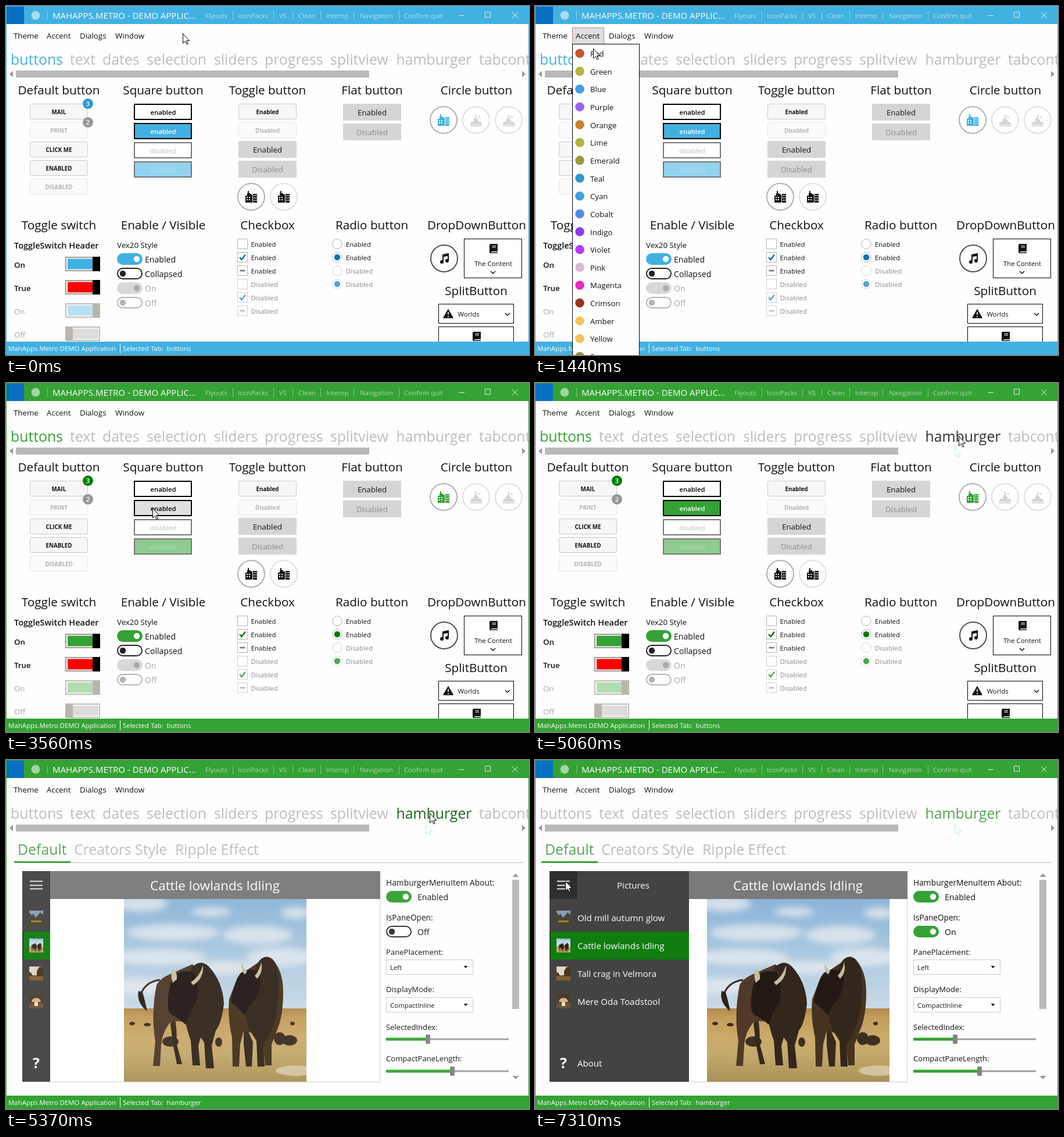
These frames come from a looping animation (900x600 px, 8 s). An HTML page:

```html
<!DOCTYPE html>
<html lang="en">
<head>
<meta charset="utf-8">
<title>Metro demo application</title>
<style>
html, body { margin: 0; width: 100%; height: 100%; overflow: hidden; background: #fff; }
svg { display: block; }
text { font-family: "Open Sans", "Noto Sans", sans-serif; white-space: pre; }

/* One 8 s clock: 1% is 80 ms */
.a, #stage { animation: 8s step-end infinite; }

#stage { animation-name: theme; }
@keyframes theme {
  0% { --accent: #41b1e1; --deep: #0b72b8; --badge: #2a9bd6; --light: #93d3ee; --pale: #b8e1f4; --mild: #5aa2d6; }
  36.4%, to { --accent: #34a234; --deep: #057a05; --badge: #067f06; --light: #90cb90; --pale: #b2ddb2; --mild: #53a653; }
}

.cursor { animation-name: cursor; }
@keyframes cursor {
  0% { transform: translate(304px, 47px); }
  1.25% { transform: translate(304px, 47px); animation-timing-function: steps(8, jump-both); }
  9% { transform: translate(90px, 49px); }
  17.9% { transform: translate(100px, 73px); animation-timing-function: steps(10, end); }
  27.875% { transform: translate(97px, 250px); }
  33.375% { transform: translate(109px, 256px); }
  42.375% { transform: translate(109px, 256px); animation-timing-function: steps(2, jump-both); }
  44.375% { transform: translate(252px, 215px); animation-timing-function: steps(8, end); }
  52.25% { transform: translate(722px, 109px); }
  53.25% { transform: translate(720px, 95px); }
  54.125% { transform: translate(720px, 84px); }
  60% { transform: translate(717px, 79px); }
  61% { transform: translate(729px, 91px); }
  74.75% { transform: translate(729px, 91px); animation-timing-function: steps(2, jump-both); }
  76.75% { transform: translate(518px, 168px); animation-timing-function: steps(6, end); }
  82.5% { transform: translate(64px, 224px); animation-timing-function: steps(2, end); }
  84.5%, to { transform: translate(52px, 208px); }
}
.ghost { animation-name: ghost; }
@keyframes ghost { 0% { opacity: 0; } 53.25%, to { opacity: 1; } }

.accent-hover { animation-name: accentHover; }
@keyframes accentHover { 0% { opacity: 0; } 9% { opacity: 1; } 35.5%, to { opacity: 0; } }
.menu { animation-name: menu; }
@keyframes menu {
  0% { opacity: 0; }
  11.125% { opacity: 0; animation-timing-function: steps(3, jump-both); }
  14.125% { opacity: 1; }
  35.5%, to { opacity: 0; }
}
.row { animation-name: row; }
@keyframes row {
  0% { opacity: 0; transform: none; }
  18.75% { opacity: 1; transform: none; animation-timing-function: steps(6, end); }
  27.875%, to { opacity: 1; transform: translateY(183.9px); }
}

.click-hover { animation-name: clickHover; }
@keyframes clickHover { 0% { opacity: 0; } 37.375% { opacity: 1; } 42.375%, to { opacity: 0; } }
.square-hover { animation-name: squareHover; }
@keyframes squareHover { 0% { opacity: 0; } 44.375% { opacity: 1; } 45.4%, to { opacity: 0; } }

.first { animation-name: first; }
@keyframes first { 0% { opacity: 1; } 64.125%, to { opacity: 0; } }
.tab-first { animation-name: tabFirst; }
@keyframes tabFirst { 0% { fill: var(--accent); } 64.125%, to { fill: #bdbdbd; } }
.tab-burger { animation-name: tabBurger; }
@keyframes tabBurger {
  0% { fill: #bdbdbd; }
  53.25% { fill: #333; }
  65% { fill: #1d661d; }
  74.75%, to { fill: #56a256; }
}
.second { animation-name: second; }
@keyframes second {
  0% { opacity: 0; transform: translateX(30px); }
  64.125% { opacity: .1; transform: translateX(26px); }
  65.1% { opacity: .5; transform: translateX(15px); }
  66.1% { opacity: .82; transform: translateX(7px); }
  67.1% { opacity: .96; transform: translateX(3px); }
  68.1% { opacity: .98; transform: translateX(2px); }
  69.1% { opacity: 1; transform: translateX(1px); }
  71%, to { opacity: 1; transform: none; }
}
.status-burger { animation-name: statusBurger; }
@keyframes statusBurger { 0% { opacity: 0; } 64.125%, to { opacity: 1; } }

.pane { width: 48px; animation-name: pane; }
@keyframes pane {
  0% { width: 48px; }
  86% { width: 48px; animation-timing-function: cubic-bezier(.1, .9, .2, 1); }
  91.25%, to { width: 240px; }
}
.shift { animation-name: shift; }
@keyframes shift {
  0% { transform: none; }
  86% { transform: none; animation-timing-function: cubic-bezier(.1, .9, .2, 1); }
  91.25%, to { transform: translateX(96px); }
}
.burger-hover { animation-name: burgerHover; }
@keyframes burgerHover { 0% { opacity: 0; } 84.5%, to { opacity: 1; } }
.closed { animation-name: closed; }
@keyframes closed { 0% { opacity: 1; } 86.5%, to { opacity: 0; } }
.open { animation-name: open; }
@keyframes open { 0% { opacity: 0; } 86.5%, to { opacity: 1; } }
</style>
</head>
<body>
<svg id="stage" width="900" height="600" viewBox="0 0 900 600"></svg>
<script>
const INK = '#111', GRAY = '#a8a8a8', ACCENT = 'var(--accent)', DEEP = 'var(--deep)';

const text = (x, y, s, size = 13.3, fill = INK, attrs = '') =>
  `<text x="${x}" y="${y}" font-size="${size}" fill="${fill}" ${attrs}>${s}</text>`;
const mid = (x, y, s, size, fill, attrs = '') => text(x, y, s, size, fill, `text-anchor="middle" ${attrs}`);
const rect = (x, y, w, h, fill, attrs = '') =>
  `<rect x="${x}" y="${y}" width="${w}" height="${h}" fill="${fill}" ${attrs}/>`;
const circle = (x, y, r, fill, attrs = '') => `<circle cx="${x}" cy="${y}" r="${r}" fill="${fill}" ${attrs}/>`;
const oval = (x, y, rx, ry, fill, attrs = '') =>
  `<ellipse cx="${x}" cy="${y}" rx="${rx}" ry="${ry}" fill="${fill}" ${attrs}/>`;
const path = (d, fill, attrs = '') => `<path d="${d}" fill="${fill}" ${attrs}/>`;
const line = (d, stroke, width = 1) => path(d, 'none', `stroke="${stroke}" stroke-width="${width}"`);
const group = (cls, ...parts) => `<g class="${cls}">${parts.join('')}</g>`;
const each = (list, fn) => list.map(fn).join('');
const at = (x, y, body) => `<g transform="translate(${x} ${y})">${body}</g>`;

const ARROW = 'M.5 .5V17L4.3 13.4 7 19 9.2 18 6.7 12.7H11.7Z';

const city = (x, y, fill) => at(x, y, path(
  'M-10 10V-2H-7V-6H-6V-10H-4V-6H-1V-4H2V10ZM-8 0v2h2V0ZM-4 0v2h2V0ZM-8 4v2h2V4ZM-4 4v2h2V4Z' +
  'M3 10V-5H10V10ZM4.5 -3v2h1.5v-2ZM7.5 -3v2h1.5v-2ZM4.5 1v2h1.5v-2ZM7.5 1v2h1.5v-2ZM4.5 5v2h1.5v-2ZM7.5 5v2h1.5v-2Z',
  fill, 'fill-rule="evenodd"'));
const ship = (x, y, fill) => at(x, y,
  path('M-11 8H11L8 3H4V-1H1V-9H-1V-3H-4V3H-8ZM3 -6H7V-4H3Z', fill) + rect(-10, 9, 20, 2, fill));
const book = (x, y) => at(x, y,
  path('M2 0H14V13H3V14.500H14V16H2Q0 16 0 14V2Q0 0 2 0Z', INK) + line('M4.500 3.500H11M4.500 6H11', '#fff'));
const chevron = (x, y) => line(`M${x - 4} ${y - 2}L${x} ${y + 2}L${x + 4} ${y - 2}`, INK, 1.5);
const tri = (x, y, dx, dy) => path(dx
  ? `M${x + dx * 3} ${y}L${x - dx * 3} ${y - 5.5}V${y + 5.5}Z`
  : `M${x} ${y + dy * 3}L${x - 5.5} ${y - dy * 3}H${x + 5.5}Z`, '#999');

const pill = (x, y, on, color, dot) =>
  rect(x + 1, y - 9, 42, 18, on ? color : '#fff', `rx="9" stroke="${color}" stroke-width="2"`) +
  circle(x + (on ? 34 : 10), y, 5.2, dot);

const softButton = (x, y, label, dim) =>
  rect(x + .5, y + .5, 99, 26, dim ? '#fbfbfb' : '#f7f7f7', `rx="2.5" stroke="${dim ? '#e6e6e6' : '#c9c9c9'}"`) +
  mid(x + 50, y + 18, label, 9.8, dim ? '#b5b5b5' : INK, 'font-weight="700"');
const flatButton = (x, y, label, dim) =>
  rect(x, y, 100, 29, '#d5d5d5') + mid(x + 50, y + 20, label, 13.3, dim ? '#8e8e8e' : INK);
const squareButton = (y, label, fill, color, dim) =>
  rect(221, y + 1, 98, 26, fill, `stroke="${dim ? '#757575' : '#000'}" stroke-width="2"`) +
  mid(270.5, y + 19, label, 11.3, color, dim ? '' : 'font-weight="600"');
const ring = (x, y, stroke) => circle(x, y, 23, '#fff', `stroke="${stroke}" stroke-width="2"`);

const toggle = (y, on, fill, dim) => {
  const knob = dim ? '#bab5af' : '#000';
  return rect(103, y - 11.5, 58, 23, '#fff', `stroke="${dim ? '#c4bcb4' : '#a39b91'}" stroke-width="2"`) +
    rect(106, y - 9, 53, 18, fill) + rect(on ? 149 : 102, y - 12.5, 13, 25, knob);
};

const check = (y, mark, dim) =>
  rect(398.5, y - 8.5, 17, 17, '#fff', `stroke="${dim ? '#d0d0d0' : '#b4b4b4'}"`) +
  (mark === 1 ? line(`M402 ${y}L405.500 ${y + 4}L412 ${y - 4.500}`, dim ? 'var(--mild)' : DEEP, 2.4) : '') +
  (mark === 2 ? line(`M402.500 ${y}H411.500`, dim ? '#bbb' : '#777', 2.6) : '') +
  text(421.5, y + 5, dim ? 'Disabled' : 'Enabled', 11.4, dim ? '#8c8c8c' : INK);
const radio = (y, on, dim) =>
  circle(570, y, 8.3, '#fff', `stroke="${dim ? '#d4d4d4' : '#b0b0b0'}"`) +
  (on ? circle(570, y, 5.2, dim ? 'var(--mild)' : DEEP) : '') +
  text(585, y + 5, dim ? 'Disabled' : 'Enabled', 11.4, dim ? '#8c8c8c' : INK);

// Window chrome
const commands = [[343, 'Flyouts'], [399, 'IconPacks'], [470, 'VS'], [503, 'Clean'],
  [551, 'Interop'], [609, 'Navigation'], [685, 'Confirm quit']];
const tabs = [[8, 'buttons', 'a tab-first'], [110, 'text'], [166, 'dates'], [242, 'selection'], [358, 'sliders'],
  [445, 'progress'], [558, 'splitview'], [671.5, 'hamburger', 'a tab-burger'], [814, 'tabcontrol']];

const chrome =
  rect(0, 0, 900, 600, '#fefefe') +
  rect(0, 0, 900, 31, ACCENT) + rect(1, 1, 30, 30, '#0870c0') +
  circle(51, 16, 7.5, '#fff', 'opacity=".55"') +
  text(80, 22, 'MAHAPPS.METRO - DEMO APPLIC...', 15, '#fff') +
  `<g opacity=".6">${each(commands, ([x, s]) => text(x, 21, s, 11.4, '#fff'))}</g>` +
  `<g opacity=".4">${line(each([71, 390, 460, 493, 541, 598, 676], x => `M${x}.500 9V24`), '#fff')}</g>` +
  line('M779 16.500H789M824.500 10.500H833.500V19.500H824.500ZM871 11L881 21M881 11L871 21', '#e4f3ec') +
  group('a accent-hover', rect(64.5, 37.5, 54, 28, '#dedede', 'stroke="#b08c7c"')) +
  each([[13, 'Theme'], [70, 'Accent'], [127, 'Dialogs'], [188, 'Window']], ([x, s]) => text(x, 56, s)) +
  each(tabs, ([x, s, cls = '']) => text(x, 100.5, s, 24.8, '#bdbdbd', `class="${cls}"`)) +
  tri(9, 117, -1, 0) + rect(17, 111, 608, 12, '#b9b9b9') + tri(891, 117, 1, 0);

const status =
  rect(0, 577, 900, 23, ACCENT) + rect(.5, .5, 899, 599, 'none', `stroke="${ACCENT}"`) +
  text(4, 593, 'MahApps.Metro DEMO Application', 11.45, '#fff') + rect(196, 580, 1, 17, '#fff') +
  text(201, 593, 'Selected Tab:', 11.45, '#fff') +
  group('a first', text(276.5, 593, 'buttons', 11.5, '#fff')) +
  group('a status-burger', text(276.5, 593, 'hamburger', 11.3, '#fff'));

// First page
const headings = [
  [91, 152, 'Default button'], [270.5, 152, 'Square button'], [450, 152, 'Toggle button'],
  [630, 152, 'Flat button'], [809.5, 152, 'Circle button'], [91, 384, 'Toggle switch'],
  [270.5, 384, 'Enable / Visible'], [450, 384, 'Checkbox'], [629.5, 384, 'Radio button'],
  [810, 384, 'DropDownButton'], [809, 497, 'SplitButton']];

const controls = group('a first',
  each(headings, ([x, y, s]) => mid(x, y, s, 20.7)),
  softButton(41, 168, 'MAIL'), softButton(41, 200, 'PRINT', true), softButton(41, 233, 'CLICK ME'),
  group('a click-hover', rect(41.5, 233.5, 99, 26, '#e0e0e0', 'rx="2.5" stroke="#b0b0b0"'),
    mid(91, 251, 'CLICK ME', 9.8, INK, 'font-weight="700"')),
  softButton(41, 265, 'ENABLED'), softButton(41, 297, 'DISABLED', true),
  circle(141, 168, 9, 'var(--badge)'), mid(141, 172, '3', 11, '#fff', 'font-weight="600"'),
  circle(141, 200, 9, '#97979a'), mid(141, 204, '2', 11, '#fff', 'font-weight="600"'),

  squareButton(168, 'enabled', '#fff', '#000'), squareButton(201, 'enabled', ACCENT, '#fff'),
  group('a square-hover', squareButton(201, 'enabled', '#e0e0e0', '#000')),
  squareButton(234, 'disabled', '#fff', '#bbb', true),
  squareButton(267, 'disabled', 'var(--light)', 'var(--pale)', true),

  softButton(400, 168, 'Enabled'), softButton(400, 200, 'Disabled', true),
  flatButton(400, 232, 'Enabled'), flatButton(400, 266, 'Disabled', true),
  ring(422, 328, '#b0b0b0'), ring(478, 328, '#e0e0e0'), city(422, 328, INK), city(478, 328, INK),
  flatButton(580, 168, 'Enabled'), flatButton(580, 202, 'Disabled', true),
  ring(753, 196, '#b0b0b0'), ring(809, 196, '#e0e0e0'), ring(865, 196, '#e0e0e0'),
  city(753, 196, ACCENT), ship(809, 196, '#d4d4d4'), ship(865, 196, '#d4d4d4'),

  text(14, 417, 'ToggleSwitch Header', 14.5, INK, 'font-weight="600"'),
  text(14, 450, 'On', 13.3, INK, 'font-weight="600"'), text(14, 490, 'True', 13.3, INK, 'font-weight="600"'),
  text(14, 530, 'On', 13.3, GRAY), text(14, 570, 'Off', 13.3, GRAY),
  toggle(443.5, true, ACCENT), toggle(483.5, true, '#f00'),
  toggle(523.5, true, 'var(--pale)', true), toggle(563.5, false, '#dcdcdc', true),

  text(191, 416, 'Vex20 Style'),
  pill(191, 435, true, ACCENT, '#fff'), text(239, 441, 'Enabled', 14.1),
  pill(191, 460, false, '#222', '#222'), text(239, 466, 'Collapsed', 14.1),
  pill(191, 485, true, '#d8d8d8', '#aaa'), text(239, 491, 'On', 14.1, GRAY),
  pill(191, 510, false, '#b4b4b4', '#b4b4b4'), text(239, 516, 'Off', 14.1, GRAY),

  each([0, 1, 2, 0, 1, 2], (mark, i) => check(409 + 23 * i, mark, i > 2)),
  each([0, 1, 0, 1], (on, i) => radio(409 + 23 * i, on, i > 1)),

  ring(754, 434, '#505050'),
  circle(750, 440, 3, INK), circle(759, 438, 3, INK),
  line('M752 440V428L761 426V438', INK, 2), line('M752 430L761 428', INK, 3),
  rect(788.5, 400.5, 99, 67, '#fff', 'stroke="#000"'), book(832, 409),
  mid(838.5, 447, 'The Content', 11.4), chevron(838, 458),
  rect(744.5, 512.5, 129, 33, '#fff', 'stroke="#000"'),
  path('M761 522L769 536H753Z', INK, 'stroke="#111" stroke-width="1.500" stroke-linejoin="round"'),
  line('M761 526V531M761 533V535', '#fff', 1.6),
  text(777.5, 534, 'Worlds', 11.4), chevron(863, 530),
  rect(744.5, 551.5, 129, 40, '#fff', 'stroke="#000"'), book(803, 560));

// Picture of two animals on a plain, 314 x 314
const clouds = [[30, 8, 45, 14], [85, 58, 80, 14], [230, 62, 60, 16], [270, 100, 60, 16], [60, 100, 80, 14],
  [170, 118, 60, 12], [20, 150, 70, 14], [296, 24, 26, 10], [150, 22, 34, 8]];
const herd = [[14, 214, 5, 3], [40, 216, 6, 3], [252, 213, 6, 3], [290, 214, 4, 3], [80, 245, 14, 9],
  [285, 243, 13, 9], [268, 240, 10, 11], [163, 246, 6, 8]];

const photo =
  rect(0, 0, 314, 200, 'url(#sky)') +
  `<g filter="url(#soft)">${each(clouds, c => oval(...c, '#e6eaef', 'opacity=".8"'))}</g>` +
  rect(0, 188, 314, 126, 'url(#grass)') +
  each(herd, h => oval(...h, '#3e2e22')) +
  oval(295, 295, 34, 9, '#d3c3a0') +
  // left animal
  line('M62 139Q36 142 28 166', '#382a20', 3) + path('M25 158Q21 178 40 193Q37 178 32 160Z', '#2b2019') +
  path('M88 205Q92 232 90 246L100 284H91L84 248 80 214Z', '#37281d') +
  path('M56 148Q62 136 82 128L118 112 150 150 150 205 112 214Q88 206 78 214Q66 230 64 250L62 287H50L54 244Q46 200 56 148Z', '#50392a') +
  path('M116 118Q132 102 146 116Q170 142 172 180Q168 214 158 226L151 252 155 291H141L138 246 132 238 128 252 131 286H118L115 244Q104 212 100 180Z', '#33261d') +
  path('M86 132Q100 120 120 126Q132 150 124 178Q112 196 106 216Q98 208 88 202Q76 198 76 186Q74 156 86 132Z', '#231a16') +
  path('M84 120Q92 124 91 138L84 144Q79 132 84 120ZM136 114Q138 136 119 148L115 143Q130 134 136 114Z', '#c9bda0') +
  // right animal
  path('M206 210L222 246 220 288H210L206 250Z', '#37281d') +
  path('M196 134Q214 120 230 110Q242 92 256 104Q274 124 274 160Q274 200 264 224L254 250 254 286H243L238 236 206 226 200 250 198 288H187L186 238Q178 204 181 172Z', '#46331f') +
  path('M228 114Q242 92 256 104Q270 124 266 170Q262 214 248 238L240 250 242 288H230L228 244 214 222 206 180Z', '#33261c') +
  path('M200 128Q214 116 234 126Q238 150 226 172Q214 184 208 200Q194 184 184 178Q188 146 200 128Z', '#231a16') +
  path('M203 109Q205 120 212 124L208 130Q200 122 203 109ZM236 108Q240 126 229 137L225 132Q234 122 236 108Z', '#c9bda0');

const stops = (id, list) =>
  `<linearGradient id="${id}" x2="0" y2="1">${each(list, ([o, c]) => `<stop offset="${o}" stop-color="${c}"/>`)}</linearGradient>`;
const defs = '<defs>' +
  stops('sky', [[0, '#8bb4d8'], [.45, '#a9c8e0'], [1, '#ccdbe5']]) +
  stops('grass', [[0, '#b18a4f'], [.12, '#c39d5c'], [.4, '#cbaa6b'], [.6, '#c5aa6c'], [1, '#aa9258']]) +
  `<filter id="soft" x="-20%" y="-20%" width="140%" height="140%"><feGaussianBlur stdDeviation="6"/></filter>
  <clipPath id="paneClip"><rect class="a pane" x="25" y="191" width="48" height="362"/></clipPath>
  <clipPath id="frame"><rect width="314" height="314"/></clipPath>
  <g id="photo" clip-path="url(#frame)">${photo}</g>
</defs>`;

// Second page
const thumb = (y, sky, ground, ...shapes) =>
  at(37, y, rect(0, 0, 24, 24, sky) + rect(0, 15, 24, 9, ground) + shapes.join(''));
const thumbs =
  thumb(259, '#8e9db0', '#4d4423', path('M0 16V3L4 8 7 5 11 12 15 8 19 3 24 7V16Z', '#45443e'), rect(3, 17, 18, 3, '#9d8538')) +
  `<use href="#photo" transform="translate(37 307) scale(${24 / 314})"/>` +
  thumb(355, '#ddd6cb', '#80602f', path('M13 17V8L17 1 24 0V17ZM0 16V9L4 12 6 16Z', '#4b3419')) +
  thumb(403, '#4e3b29', '#6b5439', path('M4 13Q5 6 12 6T20 13Z', '#d6b486'), rect(9, 13, 6, 7, '#ecdcc0'));

const titles = ['Old mill autumn glow', 'Cattle lowlands Idling', 'Tall crag in Velmora', 'Mere Oda Toadstool'];

const pane = `<g clip-path="url(#paneClip)">` +
  rect(25, 191, 240, 362, '#434343') + group('a burger-hover', rect(25, 191, 48, 48, '#2e2e2e')) +
  rect(25, 295, 240, 48, '#0f7d0f') + rect(25, 295, 2, 48, '#1c431c') +
  line('M38 208.500H60M38 215.500H60M38 221.500H60', '#e2e2e2', 2) + thumbs +
  mid(49, 530, '?', 25, '#fff', 'font-weight="700"') + mid(169, 220.5, 'Pictures', 15, '#fff') +
  each(titles, (s, i) => text(73, 276.5 + 48 * i, s, 15.1, '#fff')) +
  text(73, 527, 'About', 15, '#fff') + '</g>';

const combo = (y, s) => rect(651.5, y + .5, 149, 25, '#fff', 'stroke="#ccc"') +
  text(658, y + 18, s, 11.4) + path(`M784.500 ${y + 11}H791.500L788 ${y + 15}Z`, INK);
const slider = (y, x) => rect(651, y - 2.5, x - 651, 5, ACCENT) + rect(x, y - 1.5, 862 - x, 3, '#a0a0a0') +
  rect(x, y - 8, 8, 16, '#828282', 'rx="2"');

const burger = group('a second',
  text(17, 163, 'Default', 24.8, '#56a256'), text(114, 163, 'Creators Style', 24.8, '#bdbdbd'),
  text(288, 163, 'Ripple Effect', 24.8, '#bdbdbd'),
  rect(11, 176, 878, 1, '#bcbcbc'), rect(11, 174, 97, 3, ACCENT),
  rect(25.5, 191.5, 615, 362, '#fff', 'stroke="#d0d0d0"'), rect(73, 191, 568, 48, '#7a7a7a'),
  group('a shift', mid(356.5, 224, titles[1], 22.5, '#fff'), '<use href="#photo" x="200" y="239"/>'),
  pane,
  text(651, 216, 'HamburgerMenuItem About:', 13.8), pill(651, 235, true, ACCENT, '#fff'), text(705, 241, 'Enabled', 14.1),
  text(651, 276, 'IsPaneOpen:', 13.6),
  group('a closed', pill(651, 295, false, '#352b2b', '#352b2b'), text(705, 301, 'Off', 14.1)),
  group('a open', pill(651, 295, true, ACCENT, '#fff'), text(705, 301, 'On', 14.1)),
  text(651, 335, 'PanePlacement:', 13.1), combo(343, 'Left'),
  text(651, 399, 'DisplayMode:', 13.1), combo(408, 'CompactInline'),
  text(651, 464, 'SelectedIndex:', 13.1), slider(480, 719),
  text(651, 518, 'CompactPaneLength:', 13.1), slider(535, 761),
  tri(874, 198, 0, -1), rect(868, 206, 12, 222, '#bababa'), tri(874, 546, 0, 1));

// Accent menu
const swatches = [['Red', '#c8552b'], ['Green', '#b3b53c'], ['Blue', '#41a0e3'], ['Purple', '#9a63ee'],
  ['Orange', '#c8822a'], ['Lime', '#b3b53c'], ['Emerald', '#9a9a3a'], ['Teal', '#3595c8'], ['Cyan', '#459fe3'],
  ['Cobalt', '#5589e6'], ['Indigo', '#8f3bfb'], ['Violet', '#b43bff'], ['Pink', '#e0b4d4'], ['Magenta', '#e62bbe'],
  ['Crimson', '#9c3222'], ['Amber', '#f3c556'], ['Yellow', '#f3c556'], ['Brown', '#94933b']];
const menu = group('a menu',
  rect(64.5, 65.5, 115, 560, '#fefefe', 'stroke="#000"'),
  group('a row', rect(65, 66, 114, 30.6, '#dedede')),
  each(swatches, ([s, c], i) => circle(77, 81.5 + 30.65 * i, 7.8, c) + text(95, 87 + 30.65 * i, s, 13.2)));

const pointers =
  group('a ghost', at(722, 110, path(ARROW, '#fbffff', 'stroke="#bdeaee"'))) +
  group('a cursor', path(ARROW, '#fff', 'stroke="#000"'));

document.getElementById('stage').innerHTML = defs + chrome + controls + burger + status + menu + pointers;
</script>
</body>
</html>
```
